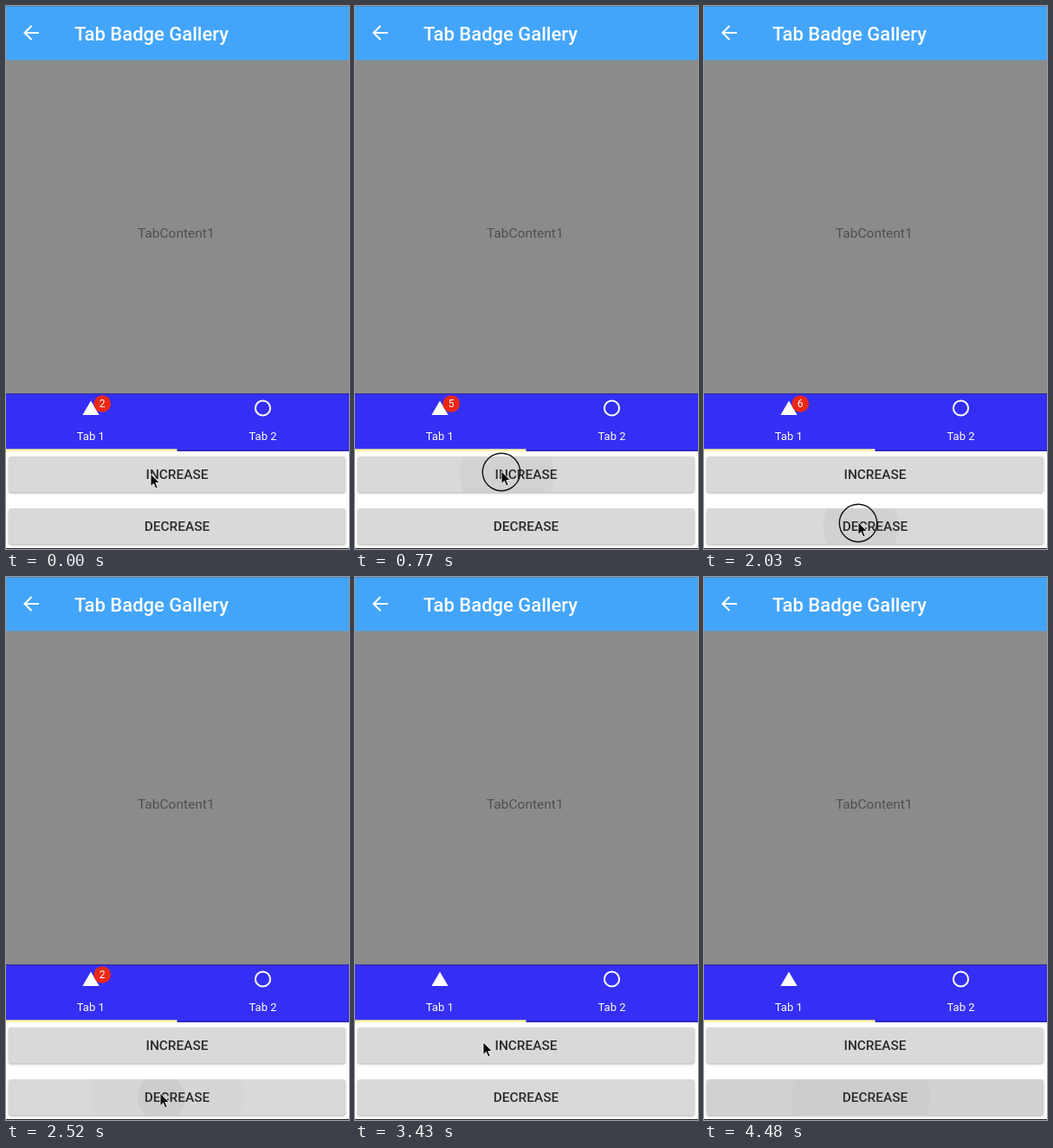
An HTML page for the animation above (4620 ms loop, 396 px wide and 628 px high).

```html
<!DOCTYPE html>
<html lang="en">
<head>
<meta charset="utf-8">
<title>Tab badge</title>
<style>
html, body { margin: 0; width: 100%; height: 100%; overflow: hidden; background: #fff; }
svg { display: block; font-family: Roboto, sans-serif; }
text { text-anchor: middle; }
.title { font-size: 22px; font-weight: 500; fill: #fff; text-anchor: start; }
.content { font-size: 15.5px; fill: #505050; }
.tab { font-size: 13px; fill: #fff; }
.count { font-size: 12px; fill: #fff; }
.label { font-size: 15.4px; font-weight: 500; fill: #2a2a2a; }
.face { fill: #d9d9d9; filter: drop-shadow(0 1.2px 1px rgba(0, 0, 0, .32)); }
</style>
</head>
<body>
<svg width="396" height="628" viewBox="0 0 396 628">
  <defs>
    <clipPath id="clip0"><rect x="3" y="521" width="389" height="41.5" rx="3"/></clipPath>
    <clipPath id="clip1"><rect x="3" y="581" width="389" height="41.5" rx="3"/></clipPath>
  </defs>
  <rect width="396" height="628" fill="#fff"/>
  <rect y="62" width="396" height="387" fill="#8b8b8b"/>
  <rect width="396" height="62.5" fill="#43a5fa"/>
  <rect width="396" height="1" fill="#3f87c4"/>
  <path d="M38 31H22M29.5 23L21.5 31L29.5 39" fill="none" stroke="#fff" stroke-width="2.1"/>
  <text class="title" x="79" y="40">Tab Badge Gallery</text>
  <text class="content" x="196.3" y="267.5">TabContent1</text>

  <rect y="448" width="396" height="67" fill="#352ff5"/>
  <rect y="448" width="396" height="1" fill="#2d2a9c"/>
  <rect x="197.5" y="513.5" width="198.5" height="1.5" fill="#2824b4"/>
  <rect y="512.3" width="197.5" height="2.9" fill="#fbf7a4"/>
  <path d="M98 456.5L107.6 473H88.4Z" fill="#fff"/>
  <circle cx="296.5" cy="465" r="8.6" fill="none" stroke="#fff" stroke-width="2"/>
  <text class="tab" x="97.8" y="502">Tab 1</text>
  <text class="tab" x="296.5" y="502">Tab 2</text>
  <g id="badge">
    <circle cx="111.2" cy="460" r="9.8" fill="#ec2813"/>
    <text class="count" id="count" x="111.2" y="464.2">2</text>
  </g>

  <rect class="face" x="3" y="521" width="389" height="41.5" rx="3"/>
  <g clip-path="url(#clip0)">
    <rect id="shade0" y="515" width="396" height="60"/>
    <g id="ripples0"></g>
  </g>
  <text class="label" x="197.5" y="547">INCREASE</text>

  <rect class="face" x="3" y="581" width="389" height="41.5" rx="3"/>
  <g clip-path="url(#clip1)">
    <rect id="shade1" y="575" width="396" height="60"/>
    <g id="ripples1"></g>
  </g>
  <text class="label" x="197.5" y="606.5">DECREASE</text>
  <rect y="627" width="396" height="1" fill="#222"/>

  <g id="cursor">
    <circle id="ring" cy="1" r="21.7" fill="none" stroke="#111" stroke-width="1.4"/>
    <path d="M0 0V14.5L3.4 11.4L5.8 17L8.2 16L5.8 10.5H10.3Z" fill="#0a0a0a" stroke="#f4f4f4" stroke-width=".9"/>
  </g>
</svg>
<script>
const LOOP = 4620, STEP = 70;
const $ = id => document.getElementById(id);
const clamp = v => Math.max(0, Math.min(1, v));

// Press times per button: increase, decrease
const presses = [
  [342, 500, 660, 820, 990, 3570],
  [1950, 2080, 2200, 2318, 2485, 2620, 2760, 4300]
];

// Cursor path: time, x, y
const path = [
  [0, 167, 541], [280, 169, 538], [1010, 169, 538], [1190, 168, 582],
  [1400, 173, 598], [1800, 178, 597], [2900, 178, 597], [3360, 148, 538],
  [3680, 148, 538], [3910, 166, 588], [4100, 172, 598], [LOOP, 172, 598]
];

function cursorAt(t) {
  const i = path.findIndex(p => p[0] > t);
  const [a, b] = [path[i - 1], path[i]];
  const u = (t - a[0]) / (b[0] - a[0]);
  const k = u * u * (3 - 2 * u);
  return [a[1] + (b[1] - a[1]) * k, a[2] + (b[2] - a[2]) * k];
}

const ripples = presses.flatMap((times, side) => times.map(start => {
  const dot = document.createElementNS("http://www.w3.org/2000/svg", "circle");
  dot.setAttribute("cy", side ? 601.5 : 541.5);
  $("ripples" + side).append(dot);
  return { start, dot, x: cursorAt(start)[0] };
}));

function drawRipple({ start, dot, x }, t) {
  const age = t - start;
  const on = age >= 0 && age < 260;
  dot.setAttribute("r", on ? 15 + 0.36 * age : 0);
  dot.setAttribute("cx", x + (197.5 - x) * Math.min(age / 500, 0.4));
  dot.setAttribute("opacity", on ? 0.05 * (1 - age / 280) : 0);
}

function draw(t) {
  const done = presses.map(times => times.filter(s => s <= t));
  const count = 2 + done[0].length - done[1].length;
  $("count").textContent = count;
  $("badge").style.display = count > 0 ? "" : "none";

  done.forEach((times, side) => {
    const age = times.length ? t - times[times.length - 1] : 1e4;
    const rise = clamp((age - 130) / 50), fall = clamp((420 - age) / 180);
    $("shade" + side).setAttribute("opacity", 0.035 * rise * fall);
  });
  ripples.forEach(r => drawRipple(r, t));

  $("cursor").setAttribute("transform", `translate(${cursorAt(t)})`);
  $("cursor").style.display = t < 4410 ? "" : "none";
  const ringed = ripples.some(r => t - r.start >= 79 && t - r.start < 140);
  $("ring").style.display = ringed ? "" : "none";
}

const begin = performance.now();
function tick() {
  const t = (performance.now() - begin) % LOOP;
  draw(Math.min(Math.floor(t / STEP) * STEP, 4480));
  requestAnimationFrame(tick);
}
tick();
</script>
</body>
</html>
```
